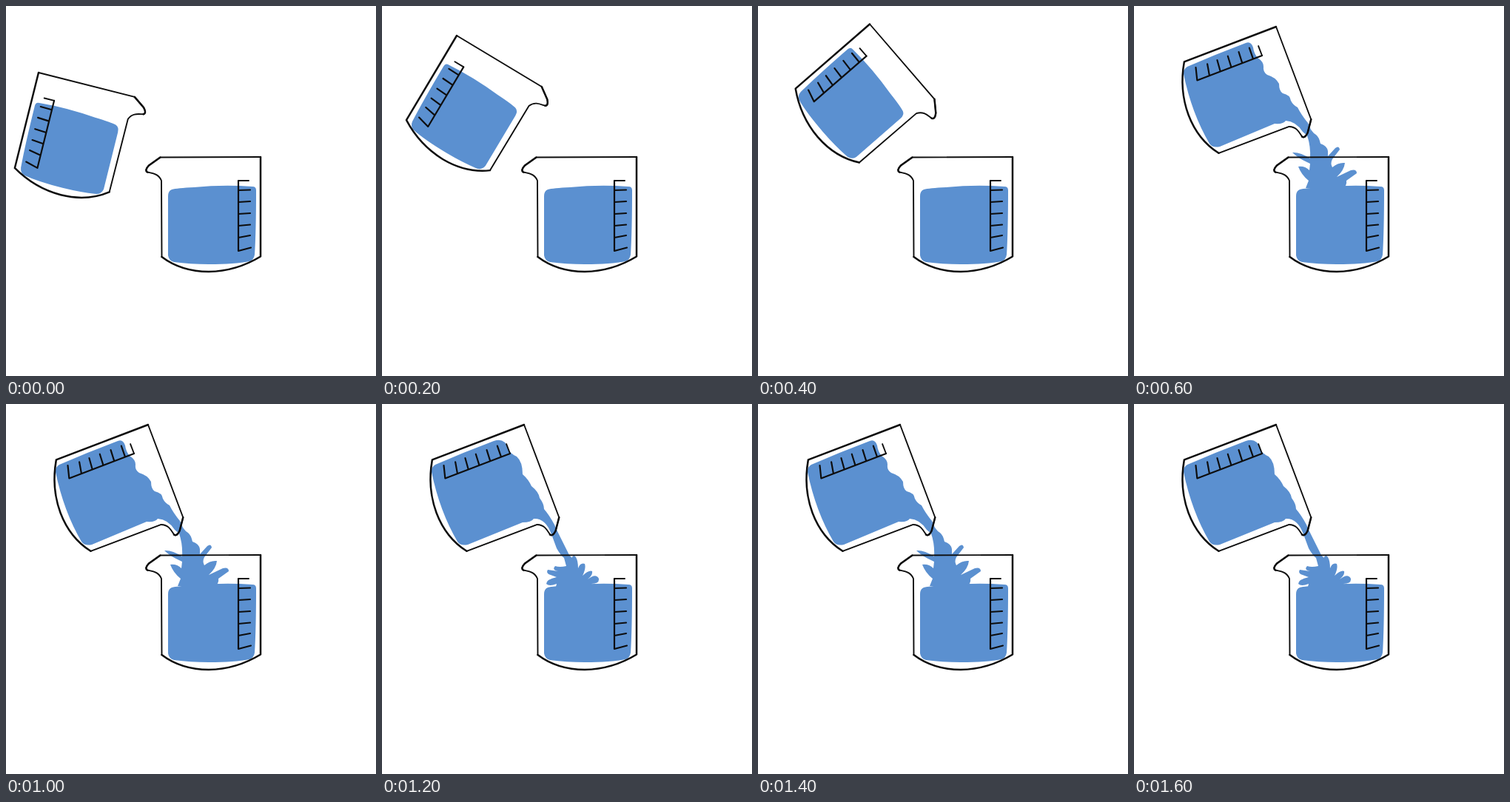
An HTML page that plays this animation: 500 by 500 pixels, repeating every 1800 ms.

```html
<!DOCTYPE html>
<html lang="en">
<head>
<meta charset="utf-8">
<title>Pouring beakers</title>
<style>
  html, body { margin: 0; width: 100%; height: 100%; overflow: hidden; background: #fff; }
  svg { display: block; width: 100%; height: 100%; }
  .water { fill: #5b90d0; }
  .ink { fill: none; stroke: #0d0d0d; stroke-width: 1.9; stroke-linecap: round; stroke-linejoin: round; }
  .bold { stroke-width: 2.5; }
</style>
</head>
<body>
<svg viewBox="0 0 500 500">
  <defs>
    <!-- Spout on the right, top left corner at the origin -->
    <g id="glass" class="ink">
      <path d="M0 0L135.5 .5L151 11.5Q157 18 153 20.5C147 22 138 22 134 32L133.5 135"/>
      <path class="bold" d="M133.5 135Q107 155 70 155Q33 154.5 0 134.5L0 0M135.5 .5L151 11.5Q157 18 153 20.5"/>
      <path d="M16 32H30"/>
      <path stroke-width="2.2" d="M30 32V127L13 122.5M30 45L14 44.5M30 61L14 60M30 77L14 76M30 93L14 91.5M30 109L14 106"/>
    </g>
    <path id="still" class="water" d="M6 45Q6 40 11 40Q50 37 90 41Q113 42 120 44Q125 46 125 53L125 133Q124 140 117 142Q95 145 70 145Q35 145 15 141Q9 139 8 132Q6 100 6 45Z"/>
  </defs>

  <use href="#still" transform="translate(344 204) scale(-1 1)"/>
  <use href="#still" id="tilted"/>
  <g class="water">
    <path class="pour" d="M67 92Q66 86 72 82L110 66L151 50Q158 47 161 56Q162 64 167 70Q175 75 175 82Q174 89 180 93Q191 96 196 105Q196 115 201 118Q211 120 212 128Q215 134 221 137Q226 147 235 158Q239 170 246 174Q250 177 252 186Q261 189 262 196L262 203L272 192Q277 188 278 194L268 207Q265 213 268 218Q276 211 285 212Q284 222 274 231L293 222Q301 220 301 226L287 236Q288 242 283 246L232 246L236 236Q226 228 222 217Q231 216 237 222L238 213Q222 206 214 198Q224 197 238 206Q239 190 234 175L228 170Q219 156 205 155Q202 160 190 159L116 190Q106 192 102 186Q78 145 67 92Z"/>
    <path class="pour" d="M67 92Q66 86 72 82L110 66L151 50Q166 45 170 60Q173 67 182 71Q190 78 190 95Q198 102 202 111Q212 119 213 127Q219 135 219 142Q226 150 233 163L237 172L253 204Q257 209 257 207Q259 203 262 207Q265 212 265 222Q268 214 274 216Q276 222 271 232Q280 224 284 226Q285 231 278 237Q289 228 293 236Q294 243 283 243L285 247L235 247L236 243Q226 247 222 243Q222 237 236 234L228 231Q221 229 224 224L238 226Q229 224 234 219Q240 221 249 219L246 208Q241 204 236 195L229 176Q221 154 205 155Q202 160 190 160L116 190Q106 192 102 186Q78 145 67 92Z"/>
  </g>
  <use href="#glass" transform="translate(344 204) scale(-1 1)"/>
  <use href="#glass" id="pourer"/>
</svg>
<script>
  const STEP = 200, STEPS = 9;
  // x, y and angle of the pouring beaker
  const poses = [[44, 90, 14], [101, 40, 30.8], [151, 24.5, 49], [192, 28, 69.1]];
  const tilted = document.getElementById('tilted');
  const pourer = document.getElementById('pourer');
  const pours = document.querySelectorAll('.pour');
  const show = (el, on) => { el.style.display = on ? '' : 'none'; };

  function draw() {
    const step = Math.floor(performance.now() / STEP) % STEPS;
    const [x, y, angle] = poses[Math.min(step, 3)];
    const transform = `translate(${x} ${y}) rotate(${angle}) scale(.988)`;
    tilted.setAttribute('transform', transform);
    pourer.setAttribute('transform', transform);
    show(tilted, step < 3);
    pours.forEach((pour, i) => show(pour, step >= 3 && (step - 3) % 2 === i));
    requestAnimationFrame(draw);
  }
  draw();
</script>
</body>
</html>
```
